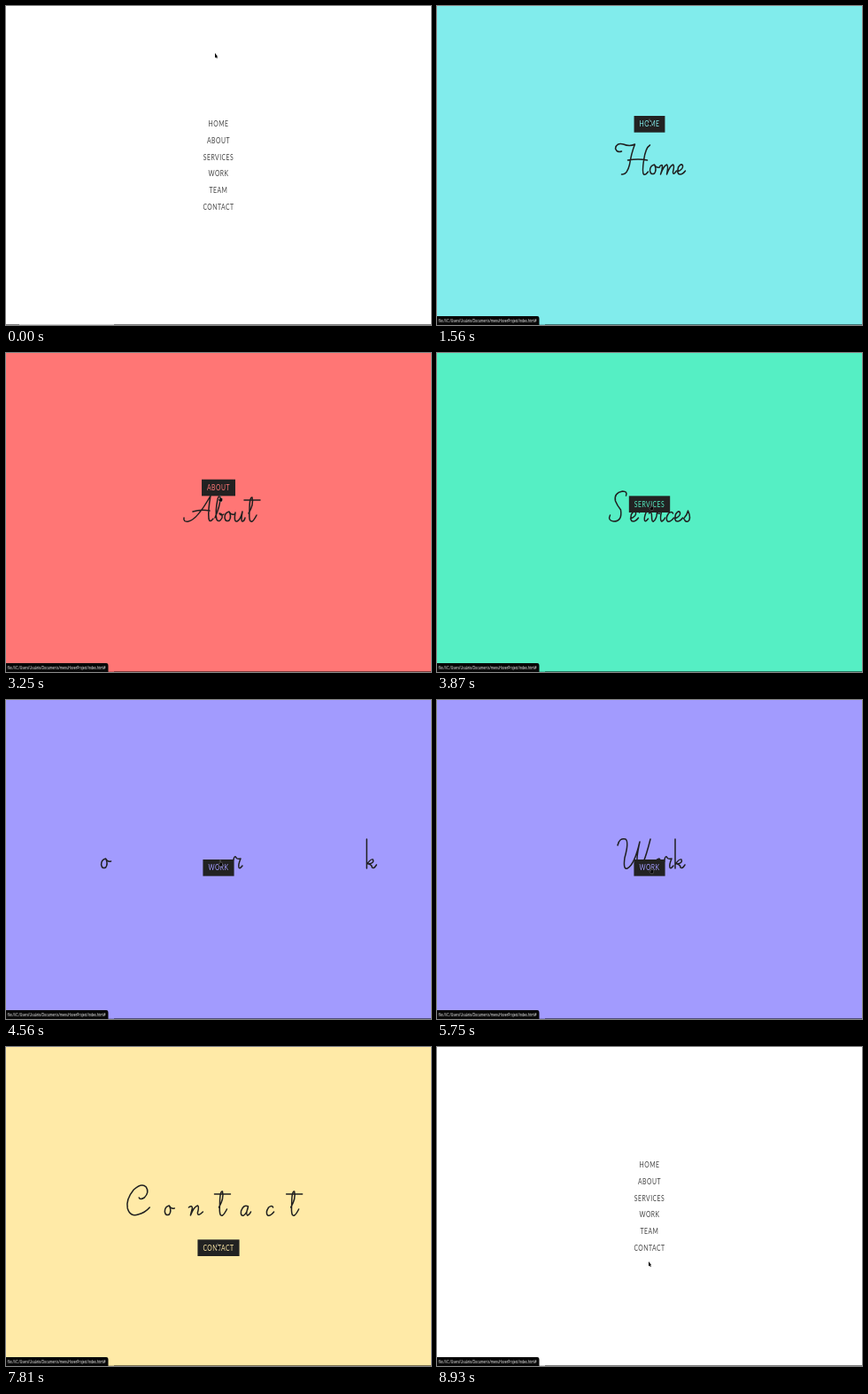
An HTML page for the animation above (9000 ms loop, 480 px wide and 360 px high).

```html
<!DOCTYPE html>
<html lang="en">
<head>
<meta charset="utf-8">
<title>Menu hover</title>
<style>
  html, body { margin: 0; height: 100%; overflow: hidden; background: #fff; }
  svg { display: block; width: 100vw; height: 100vh; }
  #menu text { font: 9.1px Lato, "Open Sans", sans-serif; letter-spacing: .65px; text-anchor: middle; }
  #status text { font: 4.72px "Open Sans", "Noto Sans", sans-serif; fill: #fff; }
  #word path { fill: none; stroke: #202020; stroke-width: 1.5; stroke-linecap: round; stroke-linejoin: round; }
</style>
</head>
<body>
<svg viewBox="0 0 480 360" preserveAspectRatio="none">
  <rect id="back" width="480" height="360"/>
  <path d="M0 359.5H15M122 359.5H480" stroke="#000" stroke-opacity=".5"/>
  <path d="M15 359.5H122" stroke="#000" stroke-opacity=".2"/>
  <g id="word"></g>
  <!-- a 640 wide page squeezed to 480 -->
  <g id="menu" transform="scale(.75 1)"></g>
  <g id="status" transform="scale(.75 1)">
    <path d="M0 350H151Q154 350 154 353V360H0Z" fill="#080808"/>
    <text x="2" y="356.9">file:///C:/Users/Usuário/Documents/menuHoverProject/index.html#</text>
  </g>
  <path id="cursor"/>
</svg>
<script>
const LOOP = 9000, SLIDE = 500, WIDE = 150, BASE = 190, ROW = 56 / 3;
const $ = id => document.getElementById(id);

const items = [
  { name: 'Home', color: '#81ecec', from: 780 },
  { name: 'About', color: '#ff7675', from: 2040 },
  { name: 'Services', color: '#55efc4', from: 3270 },
  { name: 'Work', color: '#a29bfe', from: 4517 },
  { name: 'Team', color: '#fd79a8', from: 6095 },
  { name: 'Contact', color: '#ffeaa7', from: 7500 }
];
const LEAVE = 8790;

// Handwritten letters: advance and pen path from the baseline
const glyphs = {
  H: [39, 'M9-26Q4-24 2-29Q3-36 11-34Q18-31 24-34Q20-24 18-11Q15 1 9 0M41-33Q36-30 34-16Q32-2 34 0Q36 1 39-3M16-16Q28-18 38-16'],
  A: [36, 'M3-4Q2 1 8 0Q18-2 33-29Q30-12 31-3Q32 2 36-3M13-11Q22-14 32-12'],
  S: [26, 'M22-29Q24-34 18-34Q8-32 10-23Q12-18 16-13Q18 0 8 0Q1-1 4-7'],
  W: [43, 'M3-26Q5-35 12-33Q16-30 11-12Q9 2 14 0Q22-4 28-30Q23-8 26-1Q31 3 40-33'],
  T: [28, 'M12-27Q10-20 5-22Q0-27 4-33Q9-37 18-32Q30-26 37-32M29-33Q24-28 23-19Q25-4 18-1Q12 1 10-5'],
  C: [27, 'M15-20Q16-17 21-20Q27-26 23-32Q18-37 9-29Q0-18 2-8Q5 2 14-1Q22-3 27-9'],
  a: [14, 'M10-10Q5-13 2-5Q1 1 5 0Q9-3 10-10Q7-1 9 0Q11 0 13-4'],
  b: [11, 'M2-4Q8-18 8-26Q7-31 5-25Q2-10 4-2Q7 2 10-4Q11-9 7-9Q9-6 12-8'],
  c: [10, 'M9-9Q8-12 4-9Q0-3 3 0Q6 1 10-4'],
  e: [10, 'M1-3Q8-6 7-10Q5-13 2-8Q0 0 4 0Q7 0 10-4'],
  i: [7, 'M3-11Q1-2 3 0Q5 0 7-4M4-17v.5'],
  k: [12, 'M2-33V0M2-4Q6-11 9-10Q11-6 4-5Q8-4 8-1Q10 1 13-4'],
  m: [20, 'M1-9Q4-12 4-9Q4-5 2 0Q5-9 9-11Q11-10 9 0Q12-9 16-11Q18-10 16-3Q16 2 20-4'],
  n: [17, 'M2-9Q6-12 6-8L4 0Q8-10 12-11Q14-10 12-3Q12 2 18-4'],
  o: [12, 'M7-11Q2-10 2-4Q3 1 7-1Q10-5 7-11Q9-7 13-8'],
  r: [11, 'M1-10Q2-15 4-12Q5-10 9-11Q6-4 7-1Q8 1 11-3'],
  s: [11, 'M1-3Q5-7 6-12Q10-3 6 0Q3 1 2-2'],
  t: [12, 'M4-9Q10-19 8-27Q5-28 5-12Q4 2 8 0Q10-1 13-7M-1-24H17'],
  u: [13, 'M2-10Q0 1 4 0Q8-2 10-11Q8 0 10 0Q12 0 13-4'],
  v: [12, 'M1-9Q4-12 4-6Q4 1 6 0Q10-3 10-11Q11-8 13-9']
};

const ARROW = 'M0 0V5.5L1.2 4.6L2 6.2L2.8 5.9L2 4.3H3.2Z';
const HAND = 'M-.6 0h1.1v2.5l2 .5v2l-.6 1.8h-2.7l-1.6-2.6 .5-.5 1.3 .8z';
// Pointer stops: time, x, y
const stops = [
  [0, 236, 53], [780, 239, 124], [1000, 240, 127], [1700, 240, 128], [2040, 241, 142.7],
  [2300, 241, 149], [2900, 242, 152], [3250, 242, 161], [3500, 242, 168], [4200, 242, 173],
  [4517, 242, 180], [4750, 242, 185], [5060, 242, 187], [5680, 242, 187], [6095, 243, 198.7],
  [6430, 243, 201], [6750, 242, 206], [6930, 242, 206], [7500, 240, 217.4], [7810, 239, 222],
  [8400, 239, 227], [8790, 239, 236], [8930, 239, 242], [9000, 239, 242]
];

function add(parent, tag, attrs) {
  const el = document.createElementNS('http://www.w3.org/2000/svg', tag);
  set(el, attrs);
  return parent.appendChild(el);
}
function set(el, attrs) {
  for (const key in attrs) el.setAttribute(key, attrs[key]);
}

// CSS "ease": cubic-bezier(.25, .1, .25, 1)
function ease(x) {
  if (x >= 1) return 1;
  const curve = (u, a, b) => 3 * a * u * (1 - u) ** 2 + 3 * b * u * u * (1 - u) + u ** 3;
  let lo = 0, hi = 1;
  for (let i = 0; i < 24; i++) {
    const mid = (lo + hi) / 2;
    if (curve(mid, .25, .25) < x) lo = mid; else hi = mid;
  }
  return curve(lo, .1, 1);
}

items.forEach((item, i) => {
  const y = 180 + (i - 2.5) * ROW;
  item.box = add($('menu'), 'rect', { y: y - ROW / 2, height: ROW, fill: '#222' });
  item.label = add($('menu'), 'text', { x: 320, y: y + 2.9 });
  item.label.textContent = item.name.toUpperCase();
  const width = item.label.getComputedTextLength() + 16;
  set(item.box, { x: 320 - width / 2, width });

  item.word = add($('word'), 'g', { 'aria-label': item.name });
  item.letters = [...item.name].map(ch => add(item.word, 'path', { d: glyphs[ch][1] }));
  item.width = [...item.name].reduce((sum, ch) => sum + glyphs[ch][0], 0);
});

function spread(item, gap) {
  let x = 240 - (item.width + item.name.length * gap) / 2;
  item.letters.forEach((letter, i) => {
    set(letter, { transform: `translate(${x} ${BASE})` });
    x += glyphs[item.name[i]][0] + gap;
  });
}

function pointer(t) {
  const i = stops.findIndex(s => s[0] > t);
  const [t0, x0, y0] = stops[i - 1], [t1, x1, y1] = stops[i];
  const p = (t - t0) / (t1 - t0);
  return `translate(${x0 + (x1 - x0) * p} ${y0 + (y1 - y0) * p})`;
}

function draw(t) {
  const active = t < LEAVE ? items.findLast(item => t >= item.from) : undefined;
  set($('back'), { fill: active ? active.color : '#fff' });
  for (const item of items) {
    const on = item === active;
    set(item.word, { display: on ? 'inline' : 'none' });
    set(item.box, { display: on ? 'inline' : 'none' });
    set(item.label, { display: on || !active ? 'inline' : 'none', fill: on ? item.color : '#444' });
  }
  if (active) spread(active, WIDE * (1 - ease((t - active.from) / SLIDE)));
  set($('status'), { opacity: Math.min(1, Math.max(0, (t - 860) / 120)) });
  set($('cursor'), {
    d: active ? HAND : ARROW,
    transform: pointer(t),
    fill: '#000',
    stroke: active ? '#fff' : 'none',
    'stroke-opacity': .6,
    'stroke-width': .35
  });
}

const begin = performance.now();
function tick() {
  draw((performance.now() - begin) % LOOP);
  requestAnimationFrame(tick);
}
tick();
</script>
</body>
</html>
```
